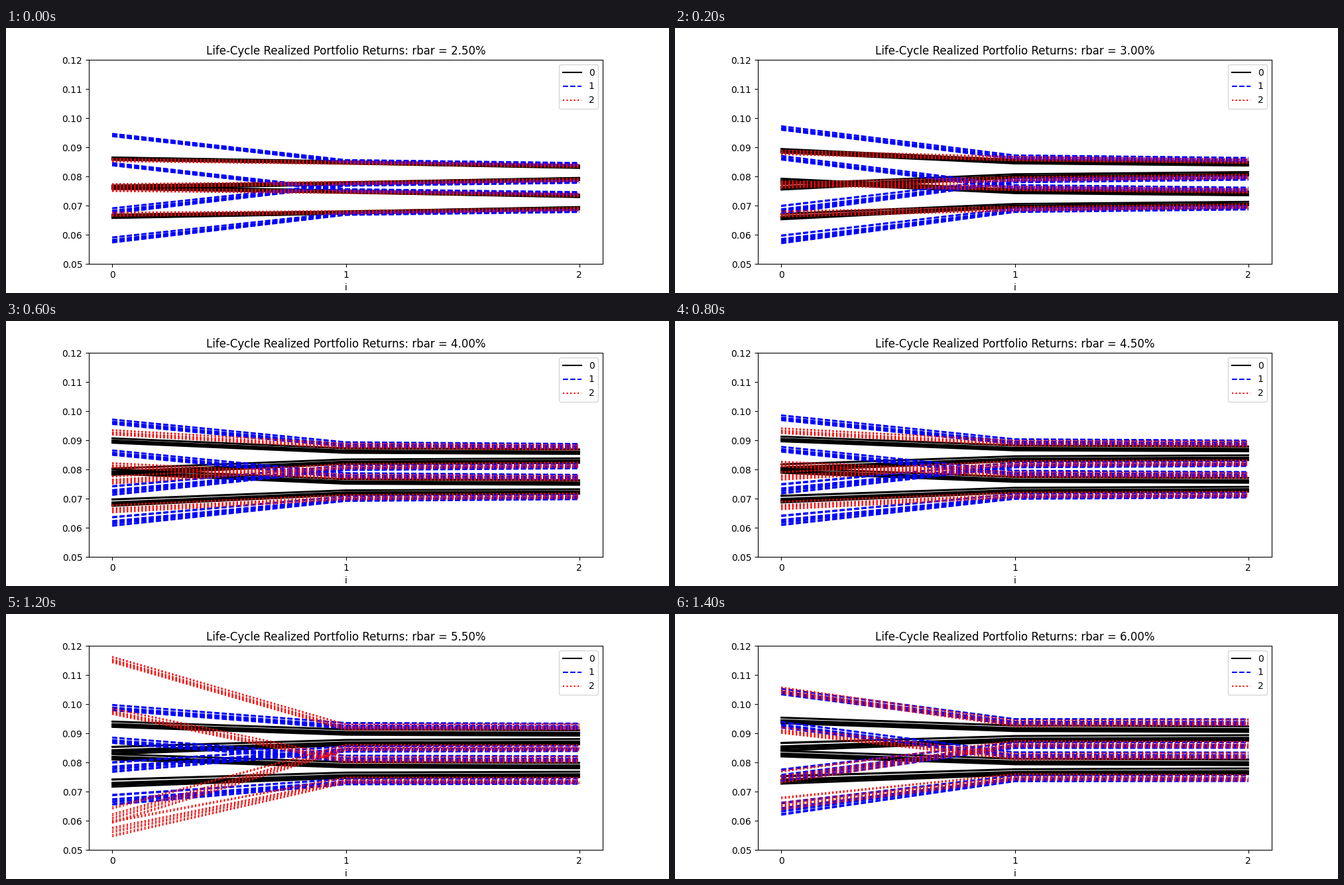
These frames come from a looping animation (1000x400 px, 1.6 s). A matplotlib script:

```python
import matplotlib.pyplot as plt
import numpy as np
from matplotlib.animation import FuncAnimation

RATES = np.arange(2.5, 6.01, 0.5)
UNIT = 1e-4

# Signs of the four bands: portfolio spread and aggregate shock
SPREAD = np.array([1, -1, 1, -1])
SHOCK = np.array([1, 1, -1, -1])

# Four close pairs of histories inside each band, from -1 to 1
HISTORY = np.add.outer([0.9, 0.05, -0.4, -0.9], [0.1, -0.1]).ravel()


def keyed(*points):
    """Piecewise linear function of the rate through a few key points."""
    return lambda rate: np.interp(rate, *zip(*points))


mean_return = keyed((2.5, 762), (3, 775), (5, 810), (5.5, 830), (6, 842))


# Each agent: line style, spread at i=0, spreads at i=1 and 2, shock loading
AGENTS = [
    ("k-", keyed((2.5, 49), (3, 62), (5, 45)),
     lambda x: (18 + 18 * np.exp(-2 * x), 15 + 6 * np.exp(-2 * x)), 0),
    ("b--", keyed((2.5, 130), (3, 140), (4, 118), (4.5, 122),
                  (5, 170), (5.5, 102), (6, 144)),
     lambda x: (40, 30 + 2.7 * x), 0),
    ("r:", keyed((2.5, 43), (4, 78), (5, 70), (5.5, 234), (6, 137)),
     lambda x: (35, 24 + 4 * x), 6e-4),
]


def returns(rate, spread, later, loading):
    """Realized returns, shape (3 ages, bands * histories)."""
    x = rate - RATES[0]
    first = spread(rate)
    shock = 50 + 2 * x
    width = 5 + 3 * np.sqrt(x)

    spreads = np.array([first, *later(x)])
    centres = (mean_return(rate) + np.outer(spreads, SPREAD) + shock * SHOCK)
    centres[0] += loading * first**2 * SPREAD * SHOCK

    # Low-spread bands fan out at the first age
    widths = np.full((3, 4), width)
    widths[0, SPREAD < 0] *= 1 + first / 140

    bands = centres[..., None] + widths[..., None] * HISTORY
    return UNIT * bands.reshape(3, -1)


fig, ax = plt.subplots(figsize=(10, 4), dpi=100)
ages = [0, 1, 2]
lines = [ax.plot(ages, returns(RATES[0], *rules), style)
         for style, *rules in AGENTS]
title = ax.set_title("")
ax.set_xlabel("i")
ax.set_xticks(ages)
ax.set_xlim(-0.1, 2.1)
ax.set_ylim(0.05, 0.12)
ax.legend([group[0] for group in lines], ["0", "1", "2"], loc="upper right")


def update(k):
    rate = RATES[k]
    title.set_text(f"Life-Cycle Realized Portfolio Returns: rbar = {rate:.2f}%")
    for group, (_, *rules) in zip(lines, AGENTS):
        for line, y in zip(group, returns(rate, *rules).T):
            line.set_ydata(y)
    return [title]


anim = FuncAnimation(fig, update, frames=len(RATES), interval=200,
                     repeat=True, repeat_delay=0, blit=False)
plt.show()
```
